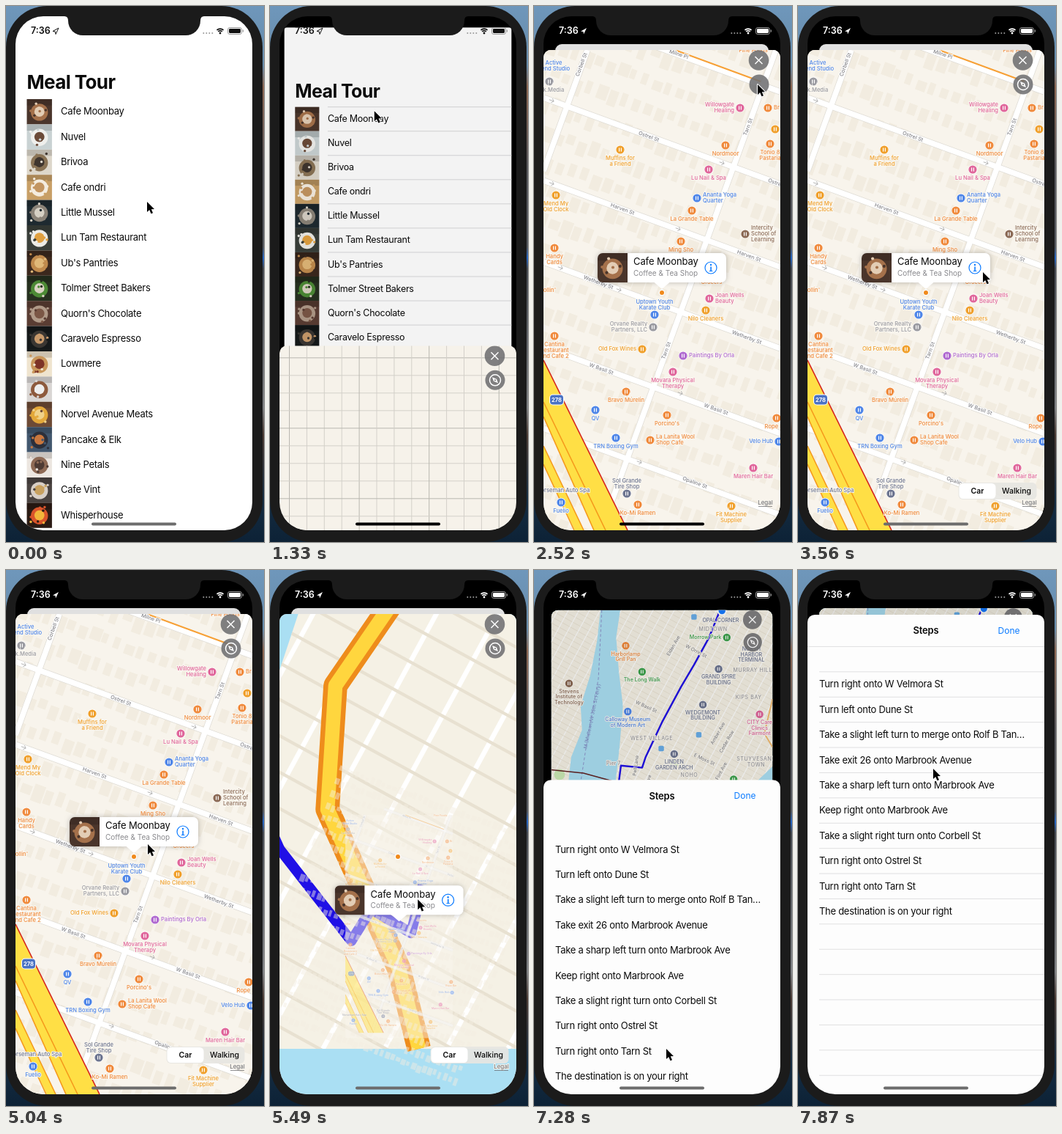
Write an HTML page with a canvas that moves like this. It is 353 by 731 pixels and loops after 8 s.

```html
<!DOCTYPE html>
<html lang="en">
<head>
<meta charset="utf-8">
<title>Cafe finder</title>
<style>
html, body { margin: 0; width: 100%; height: 100%; overflow: hidden; background: #10253a; }
canvas { display: block; width: 100vw; height: 100vh; }
</style>
</head>
<body>
<canvas></canvas>
<script>
const W = 353, H = 731, LOOP = 8000, TICK = 148.4, ROW = 34.4;
const canvas = document.querySelector('canvas'), c = canvas.getContext('2d');
const BEZEL = '#1b1b1b', BLUE = '#0a7aff';

const places = ['Cafe Moonbay', 'Nuvel', 'Brivoa', 'Cafe ondri', 'Little Mussel', 'Lun Tam Restaurant',
  "Ub's Pantries", 'Tolmer Street Bakers', "Quorn's Chocolate", 'Caravelo Espresso', 'Lowmere', 'Krell',
  'Norvel Avenue Meats', 'Pancake & Elk', 'Nine Petals', 'Cafe Vint', 'Whisperhouse'];

// background, plate and food tone of each thumbnail
const tones = ['#4a352b #a5714b #e3cdb5', '#c9d2d3 #efefec #6b4a38', '#ddd7cb #8a7355 #3f352e',
  '#c89f66 #f4ecdf #c39561', '#1e2a30 #8b8378 #d6d0c4', '#3a3f3a #ecebe6 #e0a040', '#3b281d #c08a4d #e0b878',
  '#26301f #4c8a35 #d8d2c2', '#5a3d33 #b09a88 #7b5746', '#15191a #3a3632 #c89a6b', '#efe4cf #c9975b #7d3326',
  '#d9d6d4 #8d5a3d #eeeeee', '#6d4a35 #e3a83a #f0d28a', '#42576e #2c2f3a #c9773e', '#ece6e0 #8e6a55 #4d3a33',
  '#4a4340 #d8cfc6 #c8a15f', '#2b1b14 #d9542b #f2b63a'].map(s => s.split(' '));

const steps = ['Turn right onto W Velmora St', 'Turn left onto Dune St',
  'Take a slight left turn to merge onto Rolf B Tan…', 'Take exit 26 onto Marbrook Avenue',
  'Take a sharp left turn onto Marbrook Ave', 'Keep right onto Marbrook Ave',
  'Take a slight right turn onto Corbell St', 'Turn right onto Ostrel St', 'Turn right onto Tarn St',
  'The destination is on your right'];

const hues = { o: '#f08a3c', y: '#f0a02c', p: '#e0669b', u: '#b06ad0', b: '#4f86e8',
  g: '#9a9aa0', n: '#8b6a55', d: '#6d7590', G: '#3fa34d' };

// label side (below, above, left, right, centred without icon), x, y, hue, text
const streetPois = [
  ['c', 27, 82, 'b', 'Active|Bend Studio'], ['b', 21, 103, 'g', 'Lark.Media'], ['l', 282, 139, 'p', 'Willowgate|Healing'],
  ['r', 320, 139, 'o', 'Br'], ['b', 330, 168, 'y', ''], ['b', 262, 190, 'o', 'Nordmoor'],
  ['b', 323, 188, 'o', 'Tonio 8|Pastaria'], ['b', 118, 196, 'y', 'Muffins for|a Friend'],
  ['b', 239, 223, 'p', 'Lu Nail & Spa'], ['r', 223, 262, 'b', 'Ananta Yoga|Quarter'],
  ['b', 30, 258, 'y', 'Mend My|Old Clock'], ['b', 216, 279, 'o', 'La Grande Table'],
  ['r', 289, 311, 'n', 'Intercity|School of|Learning'], ['b', 201, 321, 'o', 'Ming Sho'],
  ['b', 28, 330, 'o', 'Handy|Cards'], ['c', 20, 388, 'o', "rollin'"], ['c', 243, 377, 'o', 'Grocers'],
  ['r', 240, 399, 'p', 'Joan Wells|Beauty'], ['a', 165, 421, 'b', 'Uptown Youth|Karate Club'],
  ['b', 235, 415, 'y', 'Nilo Cleaners'], ['l', 163, 438, 'g', 'Orvane Realty|Partners, LLC'],
  ['l', 148, 468, 'y', 'Old Fox Wines'], ['r', 204, 477, 'u', 'Paintings By Orla'],
  ['b', 190, 499, 'p', 'Movara Physical|Therapy'], ['b', 126, 526, 'o', 'Bravo Múrelin'],
  ['b', 28, 450, 'o', 'Cantina|Restaurant|and Cafe 2'], ['b', 84, 551, 'b', 'QV'], ['b', 182, 558, 'o', "Porcino's"],
  ['b', 112, 589, 'b', 'TRN Boxing Gym'], ['r', 159, 592, 'o', 'La Lanita Wool|Shop Cafe'],
  ['b', 332, 562, 'o', 'Rope Bar'], ['l', 335, 594, 'b', 'Velo Hub'], ['b', 300, 630, 'p', 'Maren Hair Bar'],
  ['a', 127, 665, 'd', 'Sol Grande|Tire Shop'], ['c', 40, 661, 'd', 'Norseman Auto Spa'],
  ['b', 37, 677, 'b', 'Fuelio'], ['b', 142, 680, 'o', 'Ko-Mi Ramen'], ['b', 270, 682, 'y', 'Fit Machine|Supplier'],
  ['c', 300, 61, 'o', 'Fine Foods']];

const cityPois = [
  ['b', 122, 112, 'o', 'Harborlamp|Grill Pan'], ['b', 146, 150, 'G', 'The Long Walk'],
  ['b', 39, 167, 'n', 'Stevens|Institute of|Technology'], ['b', 125, 208, 'b', 'Calloway Museum|of Modern Art'],
  ['l', 270, 100, 'G', 'Morrow Park'], ['b', 258, 146, 'd', 'GRAND SPIRE|BUILDING'], ['b', 235, 198, 'd', 'WEDGEMONT|BUILDING'],
  ['b', 193, 270, 'd', 'LINDEN|GARDEN ARCH'], ['b', 318, 212, 'p', 'CITY Care|Clinics|Fairmont'],
  ['b', 280, 307, 'G', 'Hollins|Grove Park'], ['c', 306, 125, 'd', 'NORTH|HARBOR|TERMINAL'], ['c', 261, 75, 'd', 'OPAL CORNER'],
  ['c', 104, 284, 'g', 'Pier 7'], ['l', 128, 322, 'u', 'Vela SoHo'], ['b', 85, 484, 'G', 'The Garrison'],
  ['b', 195, 462, 'n', 'EASTERN|BRIDGE'], ['b', 299, 517, 'o', 'Farrows'], ['b', 316, 571, 'G', 'Fort Alden P'],
  ['b', 322, 638, 'G', 'Marlow Cen'], ['b', 240, 695, 'o', 'Plenty Pantry|Market']];

const districts = [['MIDTOWN', 250, 88], ['MURRAY HILL', 308, 148], ['KIPS BAY', 302, 188], ['WEST VILLAGE', 160, 248],
  ['NOHO', 215, 301], ['SOHO', 169, 334], ['TRIBECA', 136, 369], ['CHINATOWN', 197, 384], ['BATTERY', 82, 426],
  ['PARK CITY', 82, 435], ['STUYVESANT', 313, 277], ['TOWN', 313, 286], ['VINEGAR HILL', 275, 484], ['BROOKLYN', 207, 518],
  ['HEIGHTS', 207, 527], ['DOWNTOWN', 249, 539], ['BROOKLYN', 249, 548], ['COBBLE HILL', 201, 595],
  ['BOERUM HILL', 255, 619], ['RED HOOK', 130, 697]];

const cityStreets = [['Elden Ave', 192, 112, -60], ['W Orrin St', 225, 120, 28], ['W Basil St', 152, 201, 25],
  ['Pell Lane', 137, 287, -82], ['Rowan Ave', 152, 318, -72], ['Amber Ave', 257, 240, -60], ['Cedar Row', 270, 252, -60],
  ['Flint Ave', 262, 295, -62], ['E Moss St', 237, 278, 25], ['E Velmora St', 275, 345, 20], ['Kestrel St', 235, 362, 18],
  ['Plume St', 258, 388, 15], ['Tannery', 217, 325, -70], ['Ferry St', 155, 350, 30], ['Jasper St', 245, 408, -5],
  ['QRL Drive S', 197, 438, -18], ['Tide St', 137, 464, -40]];

const cursorKeys = [[0, 193, 267], [150, 193, 267], [1040, 140, 144], [1250, 140, 144], [2370, 305, 106], [2520, 306, 107],
  [3270, 306, 107], [3560, 253, 363], [4010, 253, 363], [4600, 196, 374], [5040, 194, 374], [5200, 194, 374],
  [5940, 218, 594], [6250, 218, 594], [6680, 181, 653], [7271, 181, 653], [7860, 185, 271]];

const clamp = x => Math.max(0, Math.min(1, x));
const smooth = x => (x = clamp(x)) * x * (3 - 2 * x);
const mix = (a, b, p) => a + (b - a) * p;
const spring = d => d <= 0 ? 0 : 1 - (1 + d / 90) * Math.exp(-d / 90);
const random = seed => () => (seed = (seed * 16807) % 2147483647) / 2147483647;

function layer(paint) { c.save(); paint(); c.restore(); }
function rect(x, y, w, h, fill) { c.fillStyle = fill; c.fillRect(x, y, w, h); }
function round(x, y, w, h, r, fill) {
  c.beginPath(); c.roundRect(x, y, w, h, r);
  if (fill) { c.fillStyle = fill; c.fill(); }
}
function disc(x, y, r, fill) { c.beginPath(); c.arc(x, y, r, 0, 7); c.fillStyle = fill; c.fill(); }
function trace(points) { c.beginPath(); points.forEach(p => c.lineTo(p[0], p[1])); }
function line(points, color, width) {
  trace(points); c.strokeStyle = color; c.lineWidth = width; c.stroke();
}
function shape(points, fill) { trace(points); c.closePath(); c.fillStyle = fill; c.fill(); }

function text(s, x, y, { size = 13, weight = 400, color = '#0a0a0a', align = 'left', gap = 0, turn = 0, halo } = {}) {
  layer(() => {
    c.translate(x, y); c.rotate(turn * Math.PI / 180);
    c.font = `${weight} ${size}px Inter, sans-serif`;
    c.letterSpacing = gap + 'px'; c.textAlign = align; c.textBaseline = 'middle';
    if (halo) { c.strokeStyle = halo; c.lineWidth = 2; c.strokeText(s, 0, 0); }
    c.fillStyle = color; c.fillText(s, 0, 0);
  });
}

function poi([side, x, y, hue, label]) {
  const color = hues[hue], rows = label.split('|'), n = rows.length;
  if (side !== 'c') {
    disc(x, y, 6.2, '#fff'); disc(x, y, 5.6, color);
    rect(x - 2, y - 2.5, 1.2, 5, '#fff'); rect(x + .8, y - 2.5, 1.2, 5, '#fff');
  }
  rows.forEach((row, i) => {
    const mid = y + (i - (n - 1) / 2) * 8;
    const [dx, ty, align] = { b: [0, y + 12 + i * 8, 'center'], a: [0, y - 9 - (n - 1 - i) * 8, 'center'],
      l: [-8, mid, 'right'], r: [8, mid, 'left'], c: [0, mid, 'center'] }[side];
    text(row, x + dx, ty, { size: 7.6, weight: 500, color, align, halo: '#faf7f0' });
  });
}

function thumb(i, x, y, s) {
  const [back, plate, food] = tones[i], rnd = random(i * 97 + 11);
  rect(x, y, s, s, back);
  rect(x, y, s, s * .25, 'rgba(0,0,0,.15)');
  disc(x + s * .5, y + s * .52, s * .34, plate);
  disc(x + s * .5, y + s * .5, s * .2, food);
  for (let k = 0; k < 7; k++)
    disc(x + s * (.15 + .7 * rnd()), y + s * (.15 + .7 * rnd()), s * .05, [plate, food, back][k % 3]);
}

function listScreen(p) {
  rect(13, 14, 324, 717, '#fff');
  text('Meal Tour', 28.5, 105.5, { size: 26, weight: 700, gap: -.6 });
  places.forEach((name, i) => {
    const y = 127 + i * ROW;
    if (p > 0) rect(75, y - .5, 262, 1, '#d8d8da');
    thumb(i, 28.5, y, ROW);
    text(name, 75, y + 17.5, { gap: -.28 });
  });
}

function emptyGrid() {
  for (let i = 0; i < 28; i++) {
    const color = i % 4 ? '#d3d0c9' : '#b9b7b0';
    rect(26 + i * 23.9, 60, 1, 671, color);
    rect(13, 76 + i * 24, 324, 1, color);
  }
}

function shield(x, y, label, fill) {
  round(x - 10, y - 7.5, 20, 15, 5, '#fff');
  round(x - 9, y - 6.5, 18, 13, 4, fill);
  text(label, x, y + .5, { size: 7.5, weight: 700, color: '#fff', align: 'center' });
}

function streetMap() {
  rect(13, 60, 324, 671, '#f8f4ec');
  const rnd = random(7);
  layer(() => {
    c.translate(175, 390); c.rotate(.35);
    for (let x = -330; x < 330; x += 17)
      for (let y = -390; y < 390; y += 38)
        rect(x, y + rnd() * 8, 8 + rnd() * 8, 12 + rnd() * 12, '#f2ece0');
  });
  const roads = [[[331, 60], [92, 715]], [[73, 60], [13, 225]], [[130, 42], [337, 117]]]
    .concat([125, 238, 349, 465, 576].map(y => [[13, y], [337, y + 118]]));
  roads.forEach(r => line(r, '#dfdcd5', 9));
  roads.forEach(r => line(r, '#fff', 7.5));
  line([[193, 60], [310, 103]], '#f7a035', 2);
  shape([[13, 483], [128, 715], [82, 715], [13, 560]], '#ffdf45');
  shape([[13, 600], [68, 715], [56, 715], [13, 625]], '#ffdf45');
  line([[13, 483], [128, 715]], '#d4231c', 1.6);
  [[540, 98], [560, 82], [600, 68], [625, 55]].forEach(([y, x]) => line([[13, y], [x, 715]], '#f59a1c', 1.6));
  [['Milne Pl', 198, 66, 19], ['Corbell St', 65, 80, -70], ['Ostrel St', 157, 178, 20], ['Ostrel', 330, 241, 20],
   ['Harven St', 121, 277, 20], ['Harven St', 294, 341, 20], ['Wetherby St', 88, 377, 20], ['Wetherby St', 291, 452, 20],
   ['W Basil St', 92, 495, 20], ['W Basil St', 249, 550, 20], ['Opaline St', 220, 650, 20], ['Tarn St', 293, 165, -70],
   ['Tarn St', 181, 470, -70]].forEach(([s, x, y, turn]) =>
    text(s, x, y, { size: 7.2, weight: 500, color: '#85858a', align: 'center', turn, halo: '#fff' }));
  [[24, 129], [24, 242], [257, 214], [197, 304], [36, 357], [116, 387], [200, 528], [144, 622]].forEach(([x, y]) =>
    text('→', x, y, { size: 10, color: '#a9a9a9', align: 'center', turn: 20 }));
  streetPois.forEach(poi);
  shield(31, 537, '278', '#4a72c4');
}

const hudsonSide = [[13, 60], [85, 60], [80, 105], [70, 155], [56, 200], [58, 235], [42, 275], [36, 330], [40, 385], [13, 420]];
const island = [[114, 60], [108, 100], [112, 150], [118, 200], [113, 260], [105, 330], [95, 390], [84, 440], [75, 480],
  [84, 502], [106, 508], [136, 492], [165, 466], [200, 443], [240, 430], [282, 414], [298, 388], [302, 345], [316, 308],
  [337, 288], [337, 60]];
const farShore = [[337, 452], [300, 463], [260, 468], [233, 478], [205, 499], [190, 522], [178, 560], [160, 590], [150, 620],
  [122, 652], [104, 690], [110, 715], [337, 715]];
const route = [[259, 63], [244, 100], [222, 140], [203, 172], [176, 222], [151, 275], [146, 290], [115, 287], [112, 310],
  [104, 365], [97, 410], [88, 448], [91, 458], [85, 485], [108, 570], [133, 625], [141, 645], [150, 665], [168, 688],
  [173, 680], [183, 686], [186, 674]];

function cityMap(labels) {
  rect(13, 60, 324, 671, '#aadff3');
  [hudsonSide, island, farShore].forEach(land => layer(() => {
    shape(land, '#f5f1e5'); c.clip();
    c.translate(175, 390); c.rotate(.5);
    for (let v = -420; v < 420; v += 8) {
      rect(-420, v, 840, .8, '#e8e1d1');
      rect(v * 1.7, -420, 1.2, 840, v % 24 ? '#fff' : '#fae7b0');
    }
  }));
  [[270, 100, 5], [281, 311, 7], [316, 572, 9], [85, 488, 8], [193, 284, 6], [322, 660, 10], [25, 300, 8]]
    .forEach(([x, y, r]) => disc(x, y, r, '#cbe9b4'));
  c.setLineDash([4, 3]);
  line([[87, 60], [82, 160], [64, 260], [50, 350], [42, 480], [80, 505]], '#8b8fc8', 1);
  line([[13, 465], [60, 480], [82, 502], [112, 560]], '#78b3dc', 1);
  line([[84, 505], [105, 590], [150, 550], [190, 480], [337, 430]], '#78b3dc', 1);
  c.setLineDash([]);
  line([[13, 293], [60, 298], [112, 312]], '#5f2222', 1.6);
  line([[337, 190], [325, 240], [337, 260]], '#f3b96b', 2);
  const highway = [[337, 537], [310, 533], [285, 524], [255, 503], [230, 493], [205, 498], [188, 520], [180, 555], [184, 595],
    [164, 624], [162, 655], [180, 695], [185, 715]];
  c.lineJoin = 'round';
  line(highway, '#ee8c1c', 6); line(highway, '#ffd63e', 3.6);
  line([[205, 498], [230, 493], [245, 498]], '#d23a22', 1.6);
  line([[94, 425], [88, 465]], '#f2a02c', 3);
  line(route, '#2010e6', 2.6);
  disc(263, 61, 7, '#fff'); disc(263, 61, 5, '#167bff');
  if (!labels) return;
  cityStreets.forEach(([s, x, y, turn]) =>
    text(s, x, y, { size: 7, color: '#77777c', align: 'center', turn, halo: '#fbf8f0' }));
  text('M (Midtown/W 39th St Ferry)', 73, 215, { size: 7, color: '#7a82bd', align: 'center', turn: -78 });
  text('Castle Point Ferry', 126, 582, { size: 7, color: '#5c9ccb', align: 'center', turn: -40 });
  districts.forEach(([s, x, y]) =>
    text(s, x, y, { size: 7.6, color: '#929298', align: 'center', gap: .6, halo: '#f8f5ec' }));
  text('New York', 136, 410, { size: 20, color: '#8c8c92', align: 'center', gap: 3, halo: '#f8f5ec' });
  text('BROOKLYN', 231, 564, { size: 11, weight: 500, color: '#808086', align: 'center', gap: 1, halo: '#f8f5ec' });
  [[137, 432], [174, 262], [229, 242], [222, 70], [130, 455]].forEach(([x, y]) => round(x - 4, y - 4, 8, 8, 2, '#69aee8'));
  cityPois.forEach(poi);
  shield(102, 382, '9A', '#444');
  shield(332, 536, '278', '#4a72c4');
}

function callout(x, y, size) {
  layer(() => {
    c.translate(x, y); c.scale(size, size); c.translate(-175, -391);
    c.shadowColor = 'rgba(0,0,0,.25)'; c.shadowBlur = 7;
    round(87, 337, 176, 40, 7, '#fff');
    c.shadowColor = 'transparent';
    shape([[164, 376.5], [175, 386], [186, 376.5]], '#fff');
    layer(() => { round(87, 337, 41, 40, [7, 0, 0, 7]); c.clip(); thumb(0, 87, 337, 41); });
    text(places[0], 136, 349.5, { gap: -.1 });
    text('Coffee & Tea Shop', 136, 365, { size: 10, color: '#8a8a8e' });
    c.beginPath(); c.arc(242, 357, 8, 0, 7); c.strokeStyle = BLUE; c.lineWidth = 1.2; c.stroke();
    disc(242, 353, 1.2, BLUE); rect(241.3, 355.5, 1.6, 6, BLUE); rect(239.8, 361, 4.6, 1, BLUE);
  });
}

function mapButtons(pressed) {
  disc(307.5, 74, 13.8, 'rgba(112,112,114,.88)');
  [-1, 1].forEach(d => line([[302.5, 74 - 5 * d], [312.5, 74 + 5 * d]], '#fff', 1.5));
  disc(308, 107, 13.5, 'rgba(112,112,114,.88)');
  if (pressed) return;
  c.beginPath(); c.arc(308, 107, 7.5, 0, 7); c.strokeStyle = '#fff'; c.lineWidth = 1.5; c.stroke();
  shape([[304, 103], [310, 105.5], [312, 111], [306, 108.5]], '#fff');
  disc(308, 107, 1.1, '#777');
}

function mapScreen(t) {
  const zoom = smooth((t - 5250) / 640), depth = 12;
  const x = mix(175, 180, zoom), y = mix(391, 684, zoom);
  const scaled = (k, ax, ay, paint) => layer(() => {
    c.translate(x, y); c.scale(k, k); c.translate(-ax, -ay); paint();
  });
  rect(13, 60, 324, 671, '#f6f2ea');
  if (t < 1750) emptyGrid();
  else {
    if (zoom > 0) scaled(depth ** (1 - zoom), 180, 684, () => cityMap(zoom > .95));
    if (zoom < .6) {
      c.globalAlpha = clamp((t - 1650) / 300) * (1 - zoom / .6);
      scaled(depth ** -zoom, 175, 391, streetMap);
      c.globalAlpha = 1;
    }
    if (zoom < .5) { disc(175, 391, 4.2, '#fff'); disc(175, 391, 3, '#f08a1c'); }
    text('Legal', 316.5, 677.5, { size: 8, weight: 500, color: '#77777a', align: 'center', halo: '#f8f5ee' });
    rect(307, 682, 19, .8, '#77777a');
    const pop = smooth((t - 2000) / 300);
    if (pop > 0) callout(x, y, pop);
  }
  mapButtons(t > 2450 && t < 2650);
  c.globalAlpha = clamp((t - 2560) / 280);
  if (c.globalAlpha > 0 && t > 2600) {
    round(219.5, 650, 107, 23, 6, 'rgba(232,230,226,.92)');
    round(220.5, 651, 50, 21, 5.5, '#fff');
    text('Car', 245.5, 661.5, { size: 10.5, weight: 600, align: 'center' });
    text('Walking', 299, 661.5, { size: 10.5, weight: 500, align: 'center' });
  }
  c.globalAlpha = 1;
}

function stepsSheet(settled) {
  rect(13, 60, 324, 671, '#fdfdfd');
  text('Steps', 175, 82.5, { weight: 600, align: 'center', gap: -.2 });
  text('Done', 288.5, 82.5, { size: 12, color: BLUE, align: 'center' });
  if (settled) for (let i = 0; i < 18; i++) rect(i ? 29 : 13, 103 + i * ROW, 324, 1, '#e0e0e2');
  steps.forEach((s, i) => text(s, 29, 155.5 + i * ROW, { gap: -.28 }));
}

// A full-width layer that shrinks back and dims while the next one covers it
function receding(p, top, settledTop, radius, paint) {
  layer(() => {
    c.translate(175, mix(top, settledTop, p));
    c.scale(1 - .099 * p, 1 - .099 * p);
    c.translate(-175, -top);
    round(13, top, 324, 731 - top, [radius, radius, 0, 0]); c.clip();
    paint();
    if (p > 0) rect(13, top, 324, 731, `rgba(0,0,0,${.12 * p})`);
  });
}

function statusBar(color, hollow) {
  text('7:36', 34, 34.5, { size: 12.5, weight: 600, color });
  trace([[64, 34.5], [72, 30], [68, 38.5], [67.5, 35]]); c.closePath();
  c.fillStyle = c.strokeStyle = color; c.lineWidth = 1;
  hollow ? c.stroke() : c.fill();
  for (let i = 0; i < 4; i++) disc(270.3 + i * 4, 37, 1, '#999');
  [6.8, 4.2].forEach(r => { c.beginPath(); c.arc(293, 38, r, -2.3, -.84); c.strokeStyle = color; c.lineWidth = 1.7; c.stroke(); });
  disc(293, 37, 1.4, color);
  c.beginPath(); c.roundRect(303.5, 29.5, 19, 9, 2.6); c.strokeStyle = '#999'; c.lineWidth = 1; c.stroke();
  round(305, 31, 16, 6, 1.4, color);
  rect(323.8, 32.5, 1.2, 3, '#999');
}

function cursor(t) {
  let i = cursorKeys.length - 1;
  while (cursorKeys[i][0] > t) i--;
  const a = cursorKeys[i], b = cursorKeys[i + 1] || a, p = b === a ? 0 : smooth((t - a[0]) / (b[0] - a[0]));
  layer(() => {
    c.translate(mix(a[1], b[1], p), mix(a[2], b[2], p));
    c.lineJoin = 'round';
    const arrow = [[0, 0], [0, 14], [3.2, 11], [5.5, 16.2], [8, 15.2], [5.8, 10.2], [10, 10]];
    trace(arrow); c.closePath(); c.strokeStyle = '#fff'; c.lineWidth = 2; c.stroke();
    shape(arrow, '#000');
  });
}

function desktop() {
  const g = c.createLinearGradient(0, 0, 0, H);
  [[0, '#6f97bb'], [.11, '#668baa'], [.15, '#8a6550'], [.3, '#55555a'], [.45, '#52565c'], [.47, '#2264c4'], [.49, '#44484f'],
   [.75, '#7b7d80'], [.8, '#4a3a33'], [.92, '#142c42'], [1, '#0d2236']].forEach(s => g.addColorStop(...s));
  rect(0, 0, W, H, g);
}

function draw(t) {
  c.setTransform(canvas.width / W, 0, 0, canvas.height / H, 0, 0);
  desktop();
  round(0, 0, 351, H, 56, BEZEL);
  const mapIn = spring(t - 1212), stepsIn = spring(t - 7067);
  layer(() => {
    round(13, 14, 324, 701, 38); c.clip();
    rect(0, 0, W, H, '#000');
    if (stepsIn < .3) receding(mapIn, 14, 52, 10 * mapIn, () => listScreen(mapIn));
    statusBar(mapIn < .6 ? '#111' : '#fff', mapIn < .6);
    if (mapIn > 0) layer(() => {
      c.translate(0, 671 * (1 - mapIn));
      receding(stepsIn, 60, 52, 10, () => mapScreen(t));
    });
    if (stepsIn > 0) layer(() => {
      c.translate(0, 671 * (1 - stepsIn));
      receding(0, 60, 60, 10, () => stepsSheet(stepsIn > .85));
    });
    round(117, 704.5, 116, 4, 2, t > 1212 && t < 2650 ? '#000' : '#6c6c6c');
  });
  round(85, 0, 181, 40, [0, 0, 20, 20], BEZEL);
  [[85, -1], [266, 1]].forEach(([x, d]) => {
    c.beginPath(); c.moveTo(x, 14); c.lineTo(x + 5 * d, 14); c.quadraticCurveTo(x, 14, x, 20);
    c.fillStyle = BEZEL; c.fill();
  });
  cursor(t);
}

function frame(now) {
  const ratio = devicePixelRatio || 1, w = Math.round(innerWidth * ratio), h = Math.round(innerHeight * ratio);
  if (canvas.width !== w || canvas.height !== h) { canvas.width = w; canvas.height = h; }
  draw(Math.floor((now % LOOP + 8) / TICK) * TICK);
  requestAnimationFrame(frame);
}
requestAnimationFrame(frame);
</script>
</body>
</html>
```
